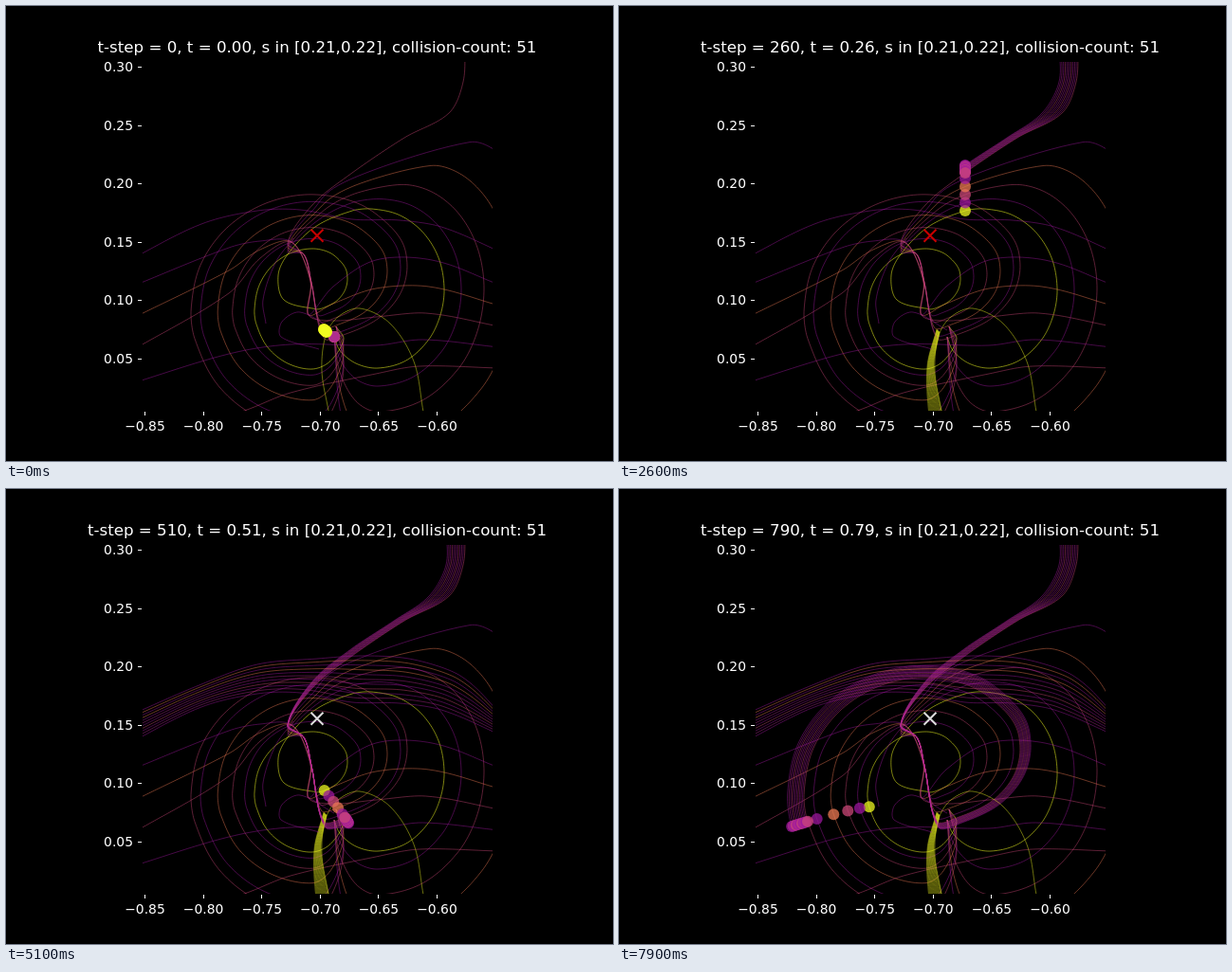
Animation of 640 by 480 pixels, one loop 8000 ms. Source, as an HTML page with a canvas:

```html
<!DOCTYPE html>
<html lang="en">
<head>
<meta charset="utf-8">
<title>Trajectories</title>
<style>
html, body { margin: 0; width: 100%; height: 100%; overflow: hidden; background: #000 }
canvas { display: block }
</style>
</head>
<body>
<canvas id="stage" width="640" height="480"></canvas>
<script>
const ctx = document.getElementById('stage').getContext('2d');
const YELLOW = '#f0f921', ORANGE = '#ed7953', PINK = '#cc4778', PURPLE = '#9c179e', MAGENTA = '#b12a90';
const mix = (a, b, u) => a + (b - a) * u;
const tracks = [];

// Points are [x, y, time]; missing times are filled in by chord length.
function fillTimes(pts) {
  const dist = [0];
  for (let i = 1; i < pts.length; i++) {
    dist[i] = dist[i - 1] + Math.hypot(pts[i][0] - pts[i - 1][0], pts[i][1] - pts[i - 1][1]);
  }
  const keys = [...pts.keys()].filter(i => pts[i][2] !== undefined);
  return pts.map((p, i) => {
    if (p[2] !== undefined) return p;
    const b = keys.find(k => k > i), a = keys[keys.indexOf(b) - 1];
    return [p[0], p[1], mix(pts[a][2], pts[b][2], (dist[i] - dist[a]) / (dist[b] - dist[a]))];
  });
}

// Smooth curve through the points, sampled as a polyline with times.
function sample(points, steps = 12) {
  const p = fillTimes(points), n = p.length - 1, out = [];
  const slope = (i, c) => {
    const a = p[Math.max(0, i - 1)], b = p[Math.min(n, i + 1)];
    return (b[c] - a[c]) / (b[2] - a[2]);
  };
  for (let i = 0; i < n; i++) {
    const a = p[i], b = p[i + 1], h = b[2] - a[2];
    for (let k = i ? 1 : 0; k <= steps; k++) {
      const u = k / steps, v = u * u * (3 - 2 * u);
      const at = c => mix(a[c], b[c], v) +
        h * (u * (1 - u) ** 2 * slope(i, c) - u * u * (1 - u) * slope(i + 1, c));
      out.push([at(0), at(1), mix(a[2], b[2], u)]);
    }
  }
  return out;
}

function add(color, points, opts) {
  tracks.push({ color, line: sample(points), dot: true, trail: false, alpha: 0.6, ...opts });
}

// n points on an ellipse after angle `from` (degrees, y down); the last one gets the time.
function arc(cx, cy, rx, ry, from, to, n, time) {
  return Array.from({ length: n }, (_, i) => {
    const a = mix(from, to, (i + 1) / n) * Math.PI / 180;
    return [cx + rx * Math.cos(a), cy + ry * Math.sin(a), i === n - 1 ? time : undefined];
  });
}

// First swing of orbit k: down, around the right side and back over the top.
function rightSwing(k) {
  const bottom = 382 + 15 * k + 4 * k * k, right = 462 + 15 * k + 3 * k * k;
  const top = 214 - 8 * k - 2.4 * k * k, cx = 385 + 6 * k + 5 * k * k;
  return [
    [346, 349, 0],
    ...arc(392, 345, 46, bottom - 345, 180, 90, 3),
    ...arc(392, 298, right - 392, bottom - 298, 90, 40, 2, 1.1),
    ...arc(392, 298, right - 392, bottom - 298, 40, 0, 2),
    ...arc(cx, 298, right - cx, 298 - top, 0, -90, 4),
    [365, 216 - 8.5 * k, 2.6],
    [326 - k, 233 - 4 * k]
  ];
}

// The S-shaped fall from the top edge, u across the stream.
const fromTop = u => [
  [mix(464, 484, u), 40, 1.5], [mix(464, 482, u), 80], [mix(446, 467, u), 113],
  [mix(409, 420, u), 139], [365, 168 + 8 * u, 2.6], [323, 203 + 7 * u]
];

// Second swing of orbit k: past the centre, then counterclockwise around it.
function centreSwing(k) {
  const near = Math.min(k, 1), top = 256 - 10 * k - 0.6 * k * k;
  const cy = 288 - 2 * k - 0.2 * k * k, rx = 37 + 14 * k;
  const left = 61 + 9 * k + 1.3 * k * k, depth = 63 + 4 * k + 2.3 * k * k;
  return [
    [297, 262 - 2.6 * k, 3.8],
    [mix(287, 314, near), mix(284, 262, near)],
    [mix(293, 322, near), mix(310, 292, near)],
    ...arc(323, cy, rx, cy - top, 96, 70, 2, 5.1),
    ...arc(323, cy, rx, cy - top, 70, -28, 4, 6.4),
    ...arc(323, cy, rx, cy - top, -28, -90, 2),
    ...arc(323, 320, left, 320 - top, -90, -180, 4),
    ...arc(323, 320, left, depth, -180, -194, 1, 7.9),
    ...arc(323, 320, left, depth, -194, -270, 3),
    ...arc(323, 320, 38, depth, -270, -330, 2),
    [348, 338, 10]
  ];
}

// Dots that run from the right edge to the left one, lane by lane.
function lane(i) {
  const start = [[520, 294 + 22 * i, 3.5], [449 - 3.2 * i, 268 + 28 * i, 3.8], [390, 268 + 30 * i]];
  const end = [130, 297 + 34 * i, 5];
  return i < 3
    ? [...start, [345, 296 + 18 * i], [319, 326], [321, 290], [301, 249], [268, 248 + 9 * i], [235, 255 + 24 * i], end]
    : [...start, [300, 357 + 51 * (i - 3)], [235, 367 + 64 * (i - 3)], end];
}

// The stream above the lanes, u from its upper to its lower edge.
const crossing = u => [
  [525, 241 + 20 * u, 3.46], [mix(479, 459, u), 197 + 36 * u, 3.8], [mix(430, 415, u), 180 + 46 * u],
  [mix(380, 365, u), 176 + 49 * u], [mix(328, 310, u), 179 + 36 * u], [265, 185 + 31 * u],
  [206, 206 + 24 * u], [130, 239 + 29 * u, 5]
];

// Strands falling away at the start.
const falling = u => [
  [335 + 3 * u, 341 + 3 * u, 0], [325 + 7 * u, 380], [327 + 14 * u, 432, 0.5], [334 + 16 * u, 460, 0.7]
];

function spread(n, make) {
  for (let i = 0; i < n; i++) make(i / (n - 1), i);
}

const laneColors = [PURPLE, ORANGE, PINK, PURPLE, PINK];
const strandColors = [PURPLE, MAGENTA, PURPLE, PINK];
[YELLOW, PURPLE, PINK, ORANGE, PURPLE].forEach((color, k) =>
  add(color, [...rightSwing(k), ...centreSwing(k)], { alpha: k ? 0.6 : 0.7 }));
laneColors.forEach((color, i) => add(color, lane(i)));
spread(15, u => add(YELLOW, falling(u), { trail: true, alpha: 0.48 }));
spread(12, (u, i) => add(strandColors[i % 4], [...fromTop(u), ...centreSwing(5.3 - 0.8 * u)], { trail: u < 1 }));
spread(11, (u, i) => add(i < 5 && i % 2 ? ORANGE : strandColors[i % 4], crossing(u), { trail: u < 1 }));

// Still curves at the centre
add(YELLOW, [[340, 427, 0], [333, 385], [337, 348], [350, 328], [373, 319], [405, 335], [430, 375], [440, 428, 1]],
  { dot: false });
add(PURPLE, [[330, 362, 0], [290, 349], [291, 333], [310, 323], [346, 342, 1]], { dot: false });
add(PURPLE, [[274, 335, 0], [271, 310], [284, 271], [303, 245, 1]], { dot: false });

function locate(line, t) {
  if (t < line[0][2]) return null;
  const i = line.findIndex(p => p[2] >= t);
  if (i < 1) return i ? null : line[0];
  const a = line[i - 1], b = line[i], u = (t - a[2]) / (b[2] - a[2]);
  return [mix(a[0], b[0], u), mix(a[1], b[1], u)];
}

function drawLine({ line, color, alpha, trail }, t) {
  ctx.globalAlpha = alpha;
  ctx.strokeStyle = color;
  ctx.beginPath();
  for (const p of line) {
    if (trail && p[2] > t) break;
    ctx.lineTo(p[0], p[1]);
  }
  const end = trail && locate(line, t);
  if (end) ctx.lineTo(end[0], end[1]);
  ctx.stroke();
}

function drawDot({ line, color }, t) {
  const p = locate(line, t);
  if (!p) return;
  ctx.globalAlpha = 0.74;
  ctx.fillStyle = color;
  ctx.beginPath();
  ctx.arc(p[0], p[1], 6, 0, 7);
  ctx.fill();
}

function drawCross(t) {
  ctx.globalAlpha = 1;
  ctx.strokeStyle = t < 4.4 ? '#c80000' : '#dcdcdc';
  ctx.lineWidth = 2;
  ctx.beginPath();
  for (const s of [-1, 1]) {
    ctx.moveTo(328 - 6.5, 242.3 - 6.5 * s);
    ctx.lineTo(328 + 6.5, 242.3 + 6.5 * s);
  }
  ctx.stroke();
}

function drawAxes(step) {
  const text = (s, x, y, align) => {
    ctx.textAlign = align;
    ctx.fillText(s, x, y);
  };
  ctx.globalAlpha = 1;
  ctx.fillStyle = '#fff';
  ctx.font = '16.67px "DejaVu Sans", sans-serif';
  text(`t-step = ${step}, t = ${(step / 1000).toFixed(2)}, s in [0.21,0.22], collision-count: 51`, 328, 49, 'center');
  ctx.font = '13.89px "DejaVu Sans", sans-serif';
  for (let i = 0; i < 6; i++) {
    const x = 146.5 + 61.6 * i, y = 64 + 61.6 * i;
    text('\u2212' + (0.85 - 0.05 * i).toFixed(2), x, 448, 'center');
    text((0.3 - 0.05 * i).toFixed(2), 134, y + 5, 'right');
    ctx.fillRect(Math.floor(x), 428, 1, 4);
    ctx.fillRect(139, Math.round(y), 4, 1);
  }
}

function frame(now) {
  const tick = Math.floor(now % 8000 / 100), t = tick / 10;
  ctx.globalAlpha = 1;
  ctx.fillStyle = '#000';
  ctx.fillRect(0, 0, 640, 480);
  ctx.save();
  ctx.beginPath();
  ctx.rect(144, 59, 369, 368);
  ctx.clip();
  ctx.lineWidth = 0.75;
  tracks.forEach(k => drawLine(k, t));
  drawCross(t);
  tracks.filter(k => k.dot).forEach(k => drawDot(k, t));
  ctx.restore();
  drawAxes(tick * 10);
  requestAnimationFrame(frame);
}
requestAnimationFrame(frame);
</script>
</body>
</html>
```
